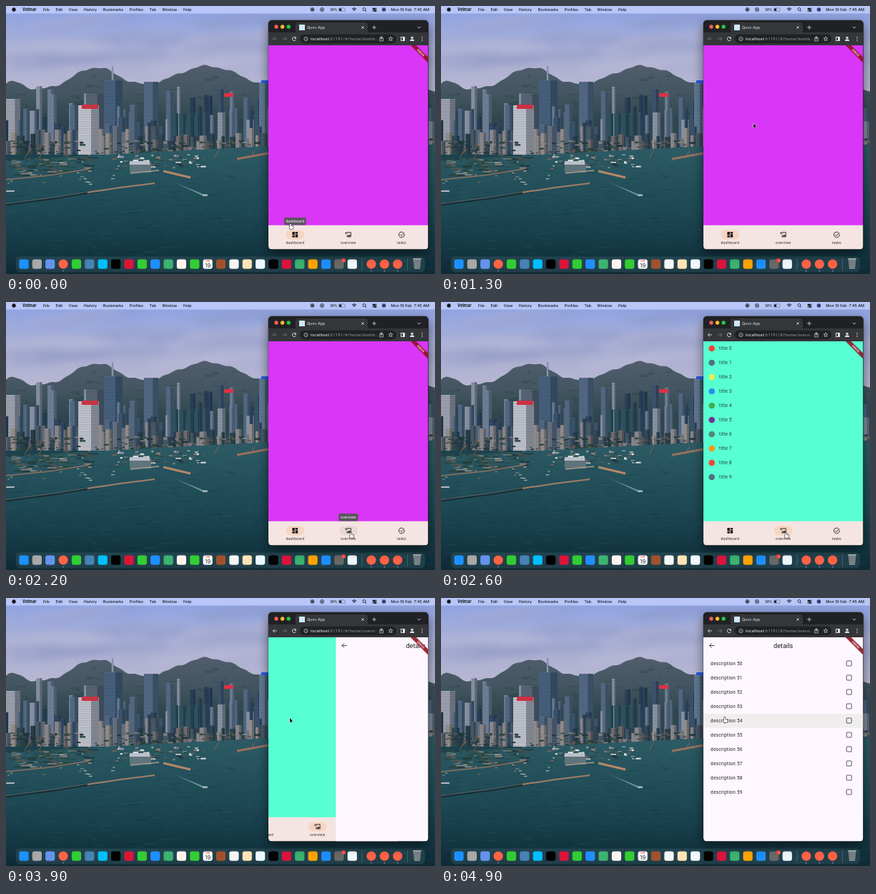
Animation, 600 px wide and 375 px high, one loop 5 s. Source, as an HTML page with a canvas:

```html
<!DOCTYPE html>
<html lang="en">
<head>
<meta charset="utf-8">
<title>Desktop demo</title>
<style>
  html, body { margin: 0; width: 100%; height: 100%; overflow: hidden; background: #1b4250; }
  canvas { position: absolute; left: 0; top: 0; width: 100vw; height: 100vh; }
</style>
</head>
<body>
<canvas id="desktop"></canvas>
<canvas id="browser"></canvas>
<script>
const W = 600, H = 375, LOOP = 5000, STEP = 100;
const dpr = window.devicePixelRatio || 1;
const UI = 'Inter, sans-serif', APP = 'Roboto, sans-serif';
let g;

// ---- Drawing helpers ----
function layer(id) {
  const canvas = document.getElementById(id);
  canvas.width = W * dpr;
  canvas.height = H * dpr;
  const context = canvas.getContext('2d');
  context.scale(dpr, dpr);
  return context;
}
function rect(x, y, w, h, fill, r = 0) {
  g.fillStyle = fill;
  g.beginPath();
  g.roundRect(x, y, w, h, r);
  g.fill();
}
function frame(x, y, w, h, color, r = 0, width = 0.8) {
  g.strokeStyle = color;
  g.lineWidth = width;
  g.beginPath();
  g.roundRect(x, y, w, h, r);
  g.stroke();
}
function disc(x, y, r, fill) {
  g.fillStyle = fill;
  g.beginPath();
  g.arc(x, y, r, 0, 7);
  g.fill();
}
function ring(x, y, r, color, width = 0.8, from = 0, to = 2 * Math.PI) {
  g.strokeStyle = color;
  g.lineWidth = width;
  g.beginPath();
  g.arc(x, y, r, from, to);
  g.stroke();
}
function trace(points) {
  g.beginPath();
  points.forEach(([x, y]) => g.lineTo(x, y));
}
function line(points, color, width = 0.8) {
  trace(points);
  g.strokeStyle = color;
  g.lineWidth = width;
  g.stroke();
}
function poly(points, fill) {
  trace(points);
  g.fillStyle = fill;
  g.fill();
}
function text(str, x, y, size, color, { font = UI, weight = 400, align = 'left', spacing = 0 } = {}) {
  g.font = `${weight} ${size}px ${font}`;
  g.textAlign = align;
  g.letterSpacing = spacing + 'px';
  g.fillStyle = color;
  g.fillText(str, x, y);
  return g.measureText(str).width;
}
function at(x, y, draw, angle = 0) {
  g.save();
  g.translate(x, y);
  g.rotate(angle);
  draw();
  g.restore();
}
function clipped(x, y, w, h, r, draw) {
  g.save();
  g.beginPath();
  g.roundRect(x, y, w, h, r);
  g.clip();
  draw();
  g.restore();
}
function gradient(y0, y1, ...colors) {
  const fill = g.createLinearGradient(0, y0, 0, y1);
  colors.forEach((c, i) => fill.addColorStop(i / (colors.length - 1), c));
  return fill;
}
function repeat(n, draw) {
  for (let i = 0; i < n; i++) draw(i);
}
// Arrow pointing right (dir 1) or left (dir -1), centred on x, y.
function arrow(x, y, dir, half, color) {
  const tip = x + dir * half, barb = x + dir * half * 0.1, rise = half * 0.9;
  line([[x - dir * half, y], [tip, y]], color);
  line([[barb, y - rise], [tip, y], [barb, y + rise]], color);
}
function cross(x, y, half, color, angle = 0) {
  at(x, y, () => {
    line([[-half, 0], [half, 0]], color);
    line([[0, -half], [0, half]], color);
  }, angle);
}

// ---- Wallpaper ----
let seed = 4177;
const rnd = (min = 0, max = 1) => {
  seed = (seed * 16807) % 2147483647;
  return min + (max - min) * seed / 2147483647;
};
const pick = list => list[Math.floor(rnd(0, list.length))];
const bump = (x, center, width) => Math.exp(-(((x - center) / width) ** 2));
const ridge = x => 118 - 12 * bump(x, 10, 20) - 32 * bump(x, 126, 45) - 34 * bump(x, 282, 65)
  - 1.2 * Math.sin(x / 7) - 0.8 * Math.sin(x / 3.1);

const GLASS = ['#71839a', '#566d86', '#3e566f', '#8d98aa', '#304a63', '#2a4258'];
const STONE = ['#6c7481', '#4b5c6a', '#334a58', '#8f8d90', '#77706f', '#2b414c', '#9b938f'];
const LAND = ['#24423c', '#2d4a42', '#3f524e', '#85827f', '#5e564f', '#20383b'];

function tower(x, y, w, base, color) {
  rect(x, y, w, base - y, color);
  rect(x + w * 0.62, y, w * 0.38, base - y, 'rgba(18,32,48,.35)');
  for (let row = y + 2; row < base; row += 2.5) rect(x, row, w, 0.8, 'rgba(20,35,52,.25)');
}
function skyline(count, top, lowest, base, colors) {
  repeat(count, i => tower((i + rnd()) * W / count - 5, rnd(top, lowest), rnd(4, 11), base, pick(colors)));
}
function sky() {
  rect(0, 0, W, 130, gradient(8, 120, '#8fa3e2', '#a3add8', '#adb0d2', '#b9b8d3'));
  g.save();
  g.filter = `blur(${6 * dpr}px)`;
  repeat(26, () => {
    const y = rnd(18, 85);
    g.fillStyle = pick(['rgba(196,190,217,.4)', 'rgba(131,144,190,.35)']);
    g.beginPath();
    g.ellipse(rnd(0, W), y, rnd(30, 80), rnd(3, 9), -0.1, 0, 7);
    g.fill();
  });
  g.restore();
}
function city() {
  const crest = Array.from({ length: W / 4 + 1 }, (_, i) => [i * 4, ridge(i * 4)]);
  poly([...crest, [W, 205], [0, 205]], gradient(84, 160, '#505d6c', '#435661', '#2f454e'));
  repeat(90, () => {
    const x = rnd(0, W), y = ridge(x) + rnd(4, 45);
    rect(x, y, rnd(3, 14), rnd(1, 3), 'rgba(38,62,62,.35)', 1);
  });

  skyline(38, 112, 150, 200, GLASS);
  line([[149, 84], [149, 106]], '#8692ac', 2.5);
  tower(0, 130, 20, 190, '#a2a6b2');
  tower(137, 104, 26, 178, '#48627f');
  tower(112, 123, 25, 190, '#5a6675');
  tower(193, 106, 20, 180, '#556b87');
  tower(354, 108, 13, 180, '#67809a');
  skyline(56, 138, 174, 204, GLASS);
  repeat(4, i => tower(232 + i * 10.3, 150, 9, 182, '#2f5561'));
  skyline(75, 168, 190, 208, STONE);
  tower(101, 139, 29, 208, '#c6c8d0');
  rect(106, 138, 23, 6, '#c93243');
  rect(305, 122, 13, 5, '#dc3145');
  rect(357, 104, 10, 4, '#2c58dc');
  repeat(260, () => rect(rnd(0, W), rnd(188, 208), rnd(2, 9), rnd(1, 3), pick(LAND)));
}
function harbour() {
  poly([[0, 216], [120, 209], [367, 196], [W, 195], [W, H], [0, H]],
    gradient(196, H, '#2d5b65', '#25525d', '#1d4854', '#163b47', '#0e2a35'));
  repeat(600, () => {
    const y = rnd(212, H);
    rect(rnd(0, W), y, rnd(4, 16), 0.7, pick(['rgba(85,135,142,.18)', 'rgba(6,24,36,.22)']));
  });
  // Reclaimed land, piers and small craft
  repeat(110, () => {
    const x = rnd(0, 115);
    rect(x, 213 - x * 0.03 + rnd(0, 24), rnd(3, 16), rnd(0.8, 2.2), pick(LAND));
  });
  line([[0, 243], [60, 237], [116, 228]], '#91725f', 1.6);
  line([[0, 278], [70, 269], [130, 259]], '#172e35', 2.6);
  line([[0, 276.5], [70, 267.5], [130, 257.5]], '#77746c', 0.7);
  line([[114, 261], [160, 254], [208, 248]], '#a27f65', 1.8);
  line([[220, 231], [258, 240]], '#b58868', 3);
  line([[323, 214], [367, 206]], '#98705f', 3);
  repeat(75, () => {
    const x = rnd(155, 275);
    rect(x, rnd(207, 225), rnd(2, 8), rnd(1, 2.5), pick(['#dadce0', '#9ba9ae', '#476369', ...LAND]));
  });
  rect(173, 219, 30, 14, '#5f747b');
  rect(173, 217, 28, 5, '#b9c1c6');
  line([[174, 234], [214, 230]], '#a99a86', 1.4);
  repeat(24, () => rect(rnd(0, 180), rnd(212, 250), rnd(2, 6), 1.2, pick(['#aeb7b9', '#7c898c', '#8b6857'])));
  [30, 50, 295, 345].forEach(x => line([[x - 4, 213], [x + 3, 202]], '#a9654e', 0.8));
  poly([[238, 248], [278, 264], [276, 266]], 'rgba(150,190,190,.6)');
  rect(275, 263.5, 7, 2.5, '#aebbbb', 1);
  rect(0, 258, 12, 2, '#b3babd', 1);
}

// ---- Menu bar and dock ----
function menuBar() {
  const ink = '#171820', bar = '#b8c6f8';
  rect(0, 0, W, 10.5, bar);
  disc(11, 5, 2.7, ink);
  text('Velmar', 23, 7, 5.7, ink, { weight: 700 });
  let x = 52;
  for (const name of 'File Edit View History Bookmarks Profiles Tab Window Help'.split(' ')) {
    x += text(name, x, 7, 5.3, ink, { weight: 500 }) + 8.6;
  }
  ring(428.5, 5, 2.5, ink);
  disc(428.5, 5, 1.4, ink);
  ring(442, 5, 2.5, ink);
  poly([[441.2, 3.6], [441.2, 6.4], [443.5, 5]], ink);
  text('38%', 453, 6.8, 4.7, ink, { weight: 500 });
  frame(465.4, 2.9, 9, 4.4, '#626a86', 1.3, 0.6);
  rect(466, 3.5, 3.2, 3.2, ink, 0.6);
  repeat(3, i => ring(487, 7.5, 1.7 + i * 1.5, ink, 0.9, -2.3, -0.84));
  ring(501, 4.5, 2, ink);
  line([[502.4, 6], [504, 7.8]], ink);
  repeat(2, i => {
    rect(512.5, 2.8 + i * 2.8, 6, 2.1, ink, 1);
    disc(517.3 - i * 3.6, 3.85 + i * 2.8, 0.65, bar);
  });
  disc(528.5, 5, 2.8, '#413c72');
  text('Mon 19 Feb  7:45 AM', 592, 7, 5.4, ink, { weight: 500, align: 'right' });
}

const DOCK = ('dodgerblue darkgray cornflowerblue tomato limegreen steelblue deepskyblue black crimson limegreen '
  + 'dodgerblue mediumseagreen seashell limegreen white sienna whitesmoke moccasin aliceblue black '
  + 'crimson mediumseagreen orange dodgerblue dimgray aliceblue | tomato tomato tomato |').split(' ');

function dock() {
  rect(14, 350.5, 572, 22, 'rgba(100,135,145,.2)', 6);
  let x = 25;
  for (const color of DOCK) {
    if (color === '|') {
      rect(x - 5, 353, 0.6, 17, 'rgba(205,220,224,.35)');
      x += 8.3;
    } else {
      const round = color === 'tomato';
      rect(x - 6.6, 354.5, 13.2, 13.2, color, round ? 6.6 : 3);
      if (round) disc(x, 370.7, 0.65, 'lightgray');
      x += 18.37;
    }
  }
  text('FEB', 282.2, 358.4, 3.1, '#e04845', { weight: 600, align: 'center' });
  text('19', 282.2, 366, 7.7, '#303034', { align: 'center' });
  disc(472, 356, 3, '#f24443');
  text('1', 472, 357.5, 4, '#fff', { align: 'center' });
  poly([[569.5, 354], [580.5, 354], [579, 368], [571, 368]], '#7f898d');
  rect(569, 353, 12, 1.6, '#b6bcbe', 1);
  repeat(4, i => line([[571.5 + i * 2.4, 356], [571.5 + i * 2.4, 367]], '#5d686c', 0.5));
}

// ---- Browser ----
const LEFT = 367, TOP = 55, WIDTH = 223.6, BOTTOM = 340.6;

function browserChrome(page) {
  const light = '#dfe1e5', dim = '#777a7f', dark = '#202124', bar = '#35363a';
  rect(LEFT, 20, WIDTH, 35, dark);
  rect(405, 23, 101, 15, bar, [4, 4, 0, 0]);
  rect(LEFT, 37, WIDTH, 18, bar);
  ['#fe5f57', '#febc2e', '#28c840'].forEach((color, i) => disc(378 + i * 8.6, 29, 2.7, color));
  rect(410, 26, 8, 8, '#cfe8f7', 0.5);
  text('Quvo App', 421, 32, 5.4, light);
  cross(499, 30, 2.3, light, Math.PI / 4);
  cross(515, 30, 2.8, light);
  line([[575.8, 28.8], [578, 31], [580.2, 28.8]], light);

  arrow(376.2, 46, -1, 2.8, page === 'dashboard' ? dim : light);
  arrow(389.8, 46, 1, 2.8, dim);
  ring(403, 46, 2.6, light, 0.9, 0.4, 5.6);
  poly([[405.9, 42.9], [405.9, 45.8], [403, 45.8]], light);

  rect(411, 39.8, 135, 12.4, dark, 6.2);
  ring(419.5, 46, 2.6, light, 0.7);
  text('i', 419.5, 47.7, 4.4, light, { align: 'center' });
  const url = { font: APP, spacing: 0.12 };
  const host = text('localhost', 426, 48.2, 6.1, '#f0f1f3', url);
  text(':61191/#/home/' + (page === 'dashboard' ? 'dashb…' : 'overvi…'), 426 + host, 48.2, 6.1, '#92969b', url);

  frame(522.7, 44.8, 4.6, 4.2, light, 0, 0.7);
  at(525, 44.8, () => arrow(0, 0, 1, 2.2, light), -Math.PI / 2);
  const star = Array.from({ length: 11 }, (_, i) => {
    const a = i * Math.PI / 5 - Math.PI / 2, r = i % 2 ? 1.4 : 3.1;
    return [538 + r * Math.cos(a), 46 + r * Math.sin(a)];
  });
  line(star, light, 0.7);
  rect(552, 43, 6, 6, light, 0.6);
  rect(553, 44, 2, 4, bar);
  disc(568, 44.3, 1.6, light);
  rect(565, 46.6, 6, 2.4, light, [2, 2, 0, 0]);
  repeat(3, i => disc(582, 43.5 + i * 2.5, 0.7, light));
}

const TABS = ['dashboard', 'overview', 'tasks'];
const tabX = name => 404.3 + TABS.indexOf(name) * 74.5;
const label = { font: APP, spacing: 0.2, align: 'center' };
const INK = '#211a1b';

const ICONS = {
  dashboard() {
    repeat(2, i => {
      const side = i * 4.3 - 3.9;
      rect(side, -4, 3.5, i ? 2.6 : 4.5, INK);
      rect(side, i ? -0.7 : 1.2, 3.5, i ? 4.5 : 2.6, INK);
    });
  },
  overview() {
    line([[-1.5, -3.2], [3.5, -3.2], [3.5, 3], [-1.8, 3], [-1.8, 0.5]], INK, 0.9);
    arrow(-2.4, -2.2, -1, 1.8, INK);
    poly([[-1, 2.2], [0.3, 0], [1, 1], [2, -0.6], [3, 2.2]], INK);
  },
  tasks() {
    ring(0, 0, 3.8, INK, 0.9, -0.3, 5.3);
    line([[-2, -0.2], [-0.4, 1.5], [4, -3.1]], INK, 0.9);
  }
};
function navBar(selected, hovered) {
  rect(LEFT, 306.7, WIDTH, 35, '#f4e5e2');
  for (const name of TABS) {
    const x = tabX(name);
    if (name === selected) rect(x - 13, 313.4, 26, 13, '#f5d6c4', 6.5);
    else if (name === hovered) rect(x - 13, 313.4, 26, 13, '#e7d8d7', 6.5);
    text(name, x, 333, 5.05, '#3b3032', label);
    at(x, 320, ICONS[name]);
  }
}

const DOTS = ['#f44336', '#4f7180', '#e9ee54', '#2491ed', '#3fae4c', '#743195', '#4f8878', '#ff9517'];
const body = { font: APP, spacing: 0.3 };

function homePage(page, hovered) {
  const overview = page === 'overview';
  rect(LEFT, TOP, WIDTH, 252, overview ? '#57ffd2' : '#d936f7');
  if (overview) repeat(10, i => {
    const y = 65 + i * 20;
    disc(378.7, y, 4.3, DOTS[i % DOTS.length]);
    text('title ' + i, 389, y + 2.2, 6.4, '#203c35', body);
  });
  navBar(page, hovered);
}
function detailRow(i) {
  const y = 91.5 + i * 20;
  text('description ' + (50 + i), 377, y + 2.2, 6.4, '#242127', body);
  frame(567.2, y - 3.5, 7, 7, '#49454f', 0.8, 0.9);
}
function pendingRow(i) {
  at(520, 82 + i * 15, () => {
    rect(0, -0.8, 30, 2, '#c3263f');
    repeat(12, n => rect(1 + n * 2.4, 0.1, 1.2, 0.7, '#c3ad36'));
  }, 0.05);
}
function detailsPage(loaded) {
  rect(LEFT, TOP, WIDTH, 286, '#fef7ff');
  arrow(379, 66.5, -1, 3.5, '#1d1b20');
  text('details', 478.7, 69.5, 9.2, '#1d1b20', { font: APP, align: 'center' });
  if (loaded) rect(LEFT, 161.7, WIDTH, 20, '#f0eeed');
  repeat(10, loaded ? detailRow : pendingRow);
}
function debugRibbon() {
  at(LEFT + WIDTH, TOP, () => {
    rect(-19, 12, 38, 5.5, 'rgba(145,22,34,.9)');
    text('DEBUG', 0, 16.2, 4.1, '#f3dfe2', { font: APP, weight: 700, align: 'center' });
  }, Math.PI / 4);
}
function tooltip(name) {
  const x = tabX(name), w = name.length * 3.4;
  rect(x - w / 2, 296, w, 10.6, '#5b5560', 1.8);
  text(name, x, 302.9, 5.05, '#fff', label);
}

// ---- Pointer: rests at each stop from arrive to leave ----
const STOPS = [
  { arrive: 0, leave: 200, x: 398, y: 306 },
  { arrive: 800, leave: 1000, x: 419, y: 71 },
  { arrive: 1700, leave: 1800, x: 465, y: 308.5 },
  { arrive: 2200, leave: 2600, x: 482.5, y: 324 },
  { arrive: 3300, leave: 3400, x: 387, y: 162 },
  { arrive: 3700, leave: LOOP, x: 397, y: 168 }
];
const clamp = p => Math.min(1, Math.max(0, p));
const ease = p => p * p * (3 - 2 * p);

function pointerAt(t) {
  const i = STOPS.findLastIndex(stop => stop.arrive <= t);
  const from = STOPS[i], to = STOPS[i + 1] || from;
  const p = to === from ? 0 : ease(clamp((t - from.leave) / (to.arrive - from.leave)));
  return [from.x + (to.x - from.x) * p, from.y + (to.y - from.y) * p];
}
function pointer(x, y, hand) {
  at(x, y, () => {
    if (hand) {
      for (const [grow, color] of [[0.5, '#17171a'], [0, '#fff']]) {
        rect(-1 - grow, -1.3 - grow, 1.7 + 2 * grow, 5 + 2 * grow, color, 0.9);
        rect(-1.6 - grow, 2 - grow, 5.4 + 2 * grow, 4 + 2 * grow, color, 1.5);
      }
    } else {
      const head = [[0, 0], [0, 5.7], [3.9, 4], [0, 0]], tail = [[1.6, 4], [2.5, 6.1]];
      line(head, '#fff', 1);
      line(tail, '#fff', 2);
      poly(head, '#000');
      line(tail, '#000', 1.1);
    }
  });
}

// ---- Timeline ----
const OPEN_OVERVIEW = 2400, OPEN_DETAILS = 3800, SLIDE = 400, LOADED = 4500;

function render(t) {
  const page = t < OPEN_OVERVIEW ? 'dashboard' : 'overview';
  const [x, y] = pointerAt(t);
  const loaded = t >= LOADED;
  const overNav = y > 305;
  const overList = page === 'overview' && y < 255 && (t < OPEN_DETAILS || loaded);
  const hovered = overNav ? (x < 441 ? 'dashboard' : 'overview') : null;
  const tip = t < 300 ? 'dashboard' : t >= 1700 && t < 2300 ? 'overview' : null;
  const slide = clamp((t - OPEN_DETAILS) / SLIDE);
  const shown = 1 - (1 - slide) ** 3;

  g.clearRect(0, 0, W, H);
  g.save();
  g.shadowColor = 'rgba(0,0,0,.55)';
  g.shadowBlur = 16 * dpr;
  g.shadowOffsetY = 5 * dpr;
  rect(LEFT, 20, WIDTH, BOTTOM - 20, '#202124', 5);
  g.restore();
  frame(LEFT, 20, WIDTH, BOTTOM - 20, 'rgba(10,14,18,.6)', 5, 0.8);

  clipped(LEFT, 20, WIDTH, BOTTOM - 20, 5, () => {
    browserChrome(page);
    clipped(LEFT, TOP, WIDTH, BOTTOM - TOP, 0, () => {
      if (slide < 1) at(-WIDTH * shown / 3, 0, () => homePage(page, hovered));
      if (slide > 0) at(WIDTH * (1 - shown), 0, () => detailsPage(loaded));
      if (tip) tooltip(tip);
      debugRibbon();
    });
  });
  pointer(x, y, overNav || overList);
}

g = layer('desktop');
sky();
city();
harbour();
menuBar();
dock();

g = layer('browser');
const start = performance.now();
let lastStep = -1;
function tick() {
  const step = Math.floor(((performance.now() - start) % LOOP) / STEP);
  if (step !== lastStep) render(step * STEP);
  lastStep = step;
  requestAnimationFrame(tick);
}
tick();
</script>
</body>
</html>
```
